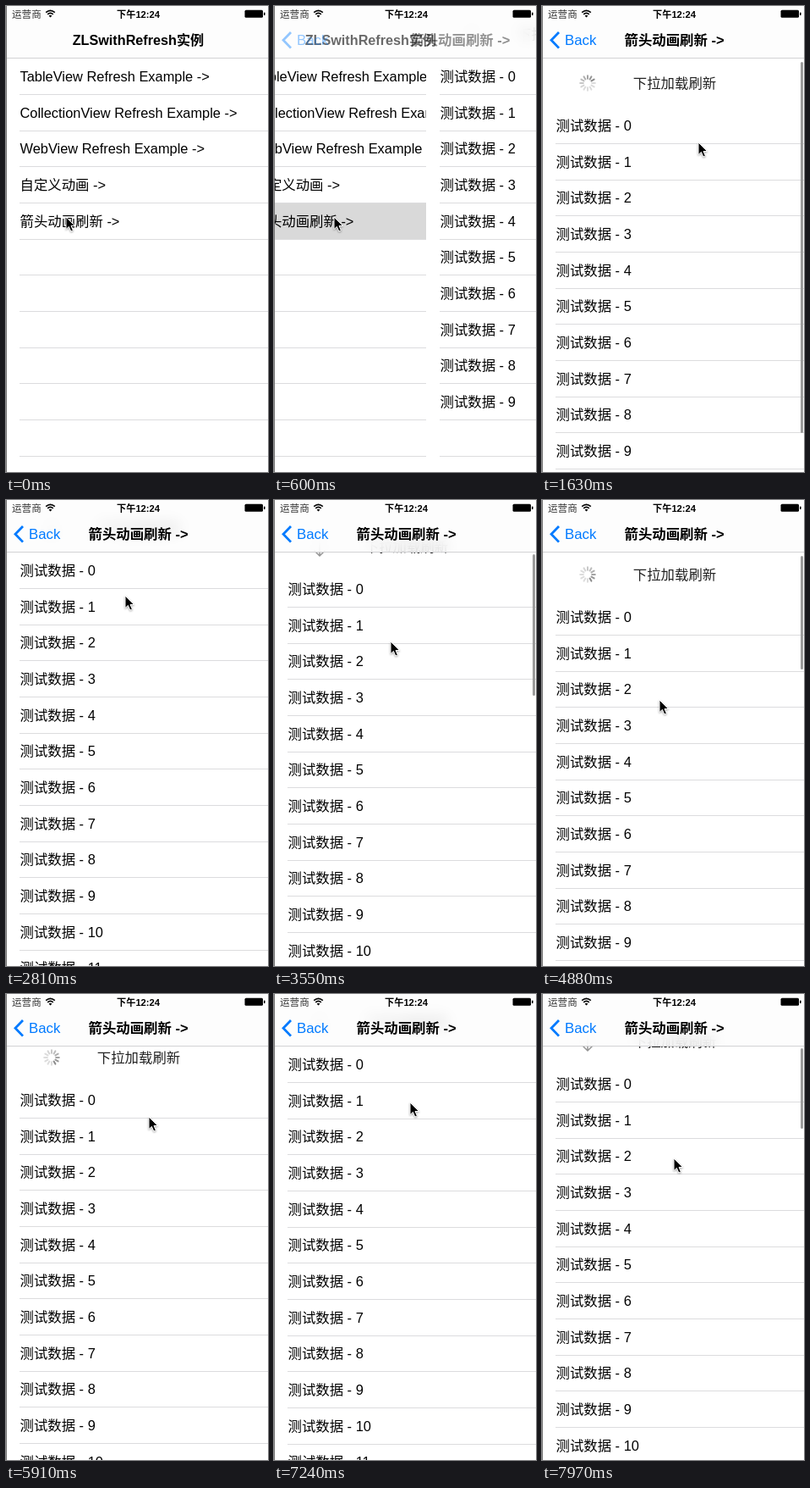
An HTML page that plays this animation: 310x550 px, repeating every 8000 ms.

```html
<!DOCTYPE html>
<html lang="zh-CN">
<head>
<meta charset="utf-8">
<style>
  html, body { margin: 0; width: 100%; height: 100%; overflow: hidden; background: #fff; }
  body { font: 16.4px "Liberation Sans", "Noto Sans CJK SC", "Noto Sans CJK", sans-serif; color: #000; }
  div, svg { position: absolute; white-space: nowrap; }
  #stage { left: 0; top: 0; width: 310px; height: 550px; overflow: hidden; }
  .page { left: 0; top: 0; width: 310px; height: 550px; background: #fff; overflow: hidden; }
  .row { left: 0; width: 310px; height: 43px; line-height: 43px; }
  .row span { position: absolute; left: 16.5px; }
  .row::after { content: ""; position: absolute; left: 16px; right: 0; bottom: 0; height: 1px; background: #dcdcde; }
  #scroller { left: 0; top: 0; width: 310px; height: 700px; }
  #header { left: 0; top: 8px; width: 310px; height: 50px; }
  #label { left: 0; width: 314px; top: 12px; line-height: 26px; text-align: center; color: #222; }
  #arrow, #spinner { left: 42px; top: 12px; }
  #nav { left: 0; top: 0; width: 310px; height: 61px; background: rgba(253, 253, 253, .8);
    backdrop-filter: blur(8px); border-bottom: 1px solid #d2d2d4; box-sizing: content-box; }
  .title { left: 0; width: 313px; top: 27px; line-height: 27px; text-align: center; font-weight: bold; }
  #back { left: 0; top: 27px; line-height: 27px; color: #007aff; font-size: 16.8px; }
  #back span { position: absolute; left: 27px; }
  #bar { left: 306px; width: 2.5px; border-radius: 2px; background: #9a9a9a; }
  #status { left: 0; top: 0; }
  #edge { left: 0; top: 0; width: 1px; height: 550px; background: #777; }
</style>
</head>
<body>
<div id="stage">
  <div class="page" id="menu"></div>
  <div class="page" id="detail">
    <div id="scroller">
      <div id="header">
        <svg id="arrow" width="24" height="26" fill="none" stroke="#959595" stroke-width="1.5"><path d="M12 2V24M5.5 17.5L12 24L18.5 17.5"/></svg>
        <svg id="spinner" width="24" height="26" viewBox="-12 -13 24 26" stroke="#777" stroke-width="2" stroke-linecap="round"></svg>
        <div id="label"></div>
      </div>
    </div>
    <div id="bar"></div>
  </div>
  <div id="nav">
    <div class="title" id="menuTitle" style="font-size:16.2px">ZLSwithRefresh实例</div>
    <div class="title" id="detailTitle">箭头动画刷新 -&gt;</div>
    <div id="back">
      <svg width="24" height="27" fill="none" stroke="#007aff" stroke-width="2.8"><path d="M20 4L11 13.3L20 22.6"/></svg>
      <span>Back</span>
    </div>
  </div>
  <svg id="status" width="310" height="20">
    <text x="7" y="13.5" font-size="11.6" fill="#333">运营商</text>
    <text x="156.5" y="13.5" font-size="11.2" font-weight="bold" text-anchor="middle">下午12:24</text>
    <g fill="none" stroke="#000" stroke-width="1.7">
      <path d="M47.2 7.6Q52.5 3 57.8 7.6M49.2 9.8Q52.5 7 55.8 9.8"/>
    </g>
    <path d="M50.6 11.4Q52.5 10 54.4 11.4L52.5 13.5Z"/>
    <rect x="282.5" y="4.8" width="21.5" height="9" rx="1.5"/>
    <rect x="305" y="7.5" width="1.5" height="3.6" rx=".7"/>
  </svg>
  <div id="edge"></div>
  <svg id="cursor" width="16" height="22" style="left:0;top:0;filter:drop-shadow(0 1px 1px rgba(0,0,0,.35))">
    <path d="M1 1V15.5L4.4 12.4L6.8 18L9.4 16.9L7 11.5H11.6Z" stroke="#fff" stroke-width="1"/>
  </svg>
</div>
<script>
const LOOP = 8000, FIRST = 450, STEP = 147.4;
const TOP = 61.4, ROW = 42.66, RELEASE_AT = 40, PETALS = 12;
const $ = id => document.getElementById(id);

// Keys are in screen refresh ticks; values between keys are linear.
const cursorKeys = [[1, 70, 248], [4, 180, 100], [5, 183, 106], [6, 184, 152], [7, 185, 183],
  [8, 184, 160], [13, 150, 116], [16, 140, 112], [18, 139, 123], [23, 136, 195], [25, 135, 213],
  [28, 137, 235], [30, 138, 235], [37, 168, 144], [46, 160, 127], [48, 158, 149], [51, 155, 193]];
const pullKeys = [[5, 0], [6, 24], [7, 42], [8, 58], [14, 58], [15, 26], [16, 0], [18, 0], [23, 37],
  [25, 45], [28, 55], [30, 55], [31, 58], [36, 58], [37, 42], [38, 12], [39, 0], [48, 0], [51, 23]];
const pushKeys = [[0, 0], [1, .42], [2, .85], [3, .98], [4, 1]];
const barKeys = [[5, 0], [6, 1], [8, 1], [10, 0], [18, 0], [19, 1], [31, 1], [33, 0], [48, 0], [49, 1]];
const barLengths = [496, 189, 118];

function sample(keys, tick, col = 1) {
  const i = keys.findIndex(k => k[0] >= tick);
  if (i < 0) return keys[keys.length - 1][col];
  if (i === 0) return keys[0][col];
  const a = keys[i - 1], b = keys[i];
  return a[col] + (b[col] - a[col]) * (tick - a[0]) / (b[0] - a[0]);
}

function addRow(parent, index, text) {
  const row = document.createElement('div');
  const label = document.createElement('span');
  row.className = 'row';
  row.style.top = Math.round(TOP + ROW * (index + 1)) - 42 + 'px';
  label.textContent = text;
  row.append(label);
  parent.append(row);
  return row;
}

const menuTexts = ['TableView Refresh Example ->', 'CollectionView Refresh Example ->',
  'WebView Refresh Example ->', '自定义动画 ->', '箭头动画刷新 ->'];
const menuRows = Array.from({ length: 11 }, (_, i) => addRow($('menu'), i, menuTexts[i] || ''));
const dataRows = Array.from({ length: 13 }, (_, i) => addRow($('scroller'), i, `测试数据 - ${i}`));

const petals = Array.from({ length: PETALS }, (_, i) => {
  const line = document.createElementNS('http://www.w3.org/2000/svg', 'line');
  line.setAttribute('y1', -5.2);
  line.setAttribute('y2', -8.8);
  line.setAttribute('transform', `rotate(${i * 360 / PETALS})`);
  $('spinner').append(line);
  return line;
});

const shift = (id, x, y = 0) => { $(id).style.transform = `translate(${x}px,${y}px)`; };

function draw(time) {
  const tick = Math.floor((time - FIRST) / STEP + .02);
  const push = sample(pushKeys, tick);
  const pull = Math.round(sample(pullKeys, tick));
  const loading = (tick >= 7 && tick < 16) || (tick >= 30 && tick < 39);
  const ready = !loading && pull >= RELEASE_AT;
  const refreshes = tick < 15 ? 0 : tick < 38 ? 1 : 2;

  shift('menu', Math.round(-95 * push));
  shift('detail', Math.round(310 * (1 - push)));
  shift('menuTitle', -100 * push);
  shift('detailTitle', 110 * (1 - push));
  $('menuTitle').style.opacity = 1 - push;
  $('detailTitle').style.opacity = $('back').style.opacity = push;
  menuRows[4].style.background = tick >= 0 && tick < 4 ? '#d9d9d9' : '';

  shift('scroller', 0, pull);
  dataRows.forEach((row, i) => {
    row.firstChild.style.opacity = i < 10 || refreshes ? 1 : 0;
  });
  $('label').textContent = ready ? '松开刷新..' : '下拉加载刷新';
  $('arrow').style.opacity = loading ? 0 : 1;
  $('arrow').style.transform = ready ? 'rotate(180deg)' : '';
  $('spinner').style.opacity = loading ? 1 : 0;
  const head = Math.floor(tick * STEP * PETALS / 1000);
  petals.forEach((petal, i) => {
    const age = ((head - i) % PETALS + PETALS) % PETALS;
    petal.style.opacity = Math.max(.25, .85 - age * .09);
  });

  const bar = $('bar').style;
  bar.top = 63 + pull * .06 + 'px';
  bar.height = Math.min(482, barLengths[refreshes] - pull) + 'px';
  bar.opacity = sample(barKeys, tick);

  shift('cursor', Math.round(sample(cursorKeys, tick, 1)), Math.round(sample(cursorKeys, tick, 2)));
}

const start = performance.now();
function play() {
  draw((performance.now() - start) % LOOP);
  requestAnimationFrame(play);
}
play();
</script>
</body>
</html>
```
